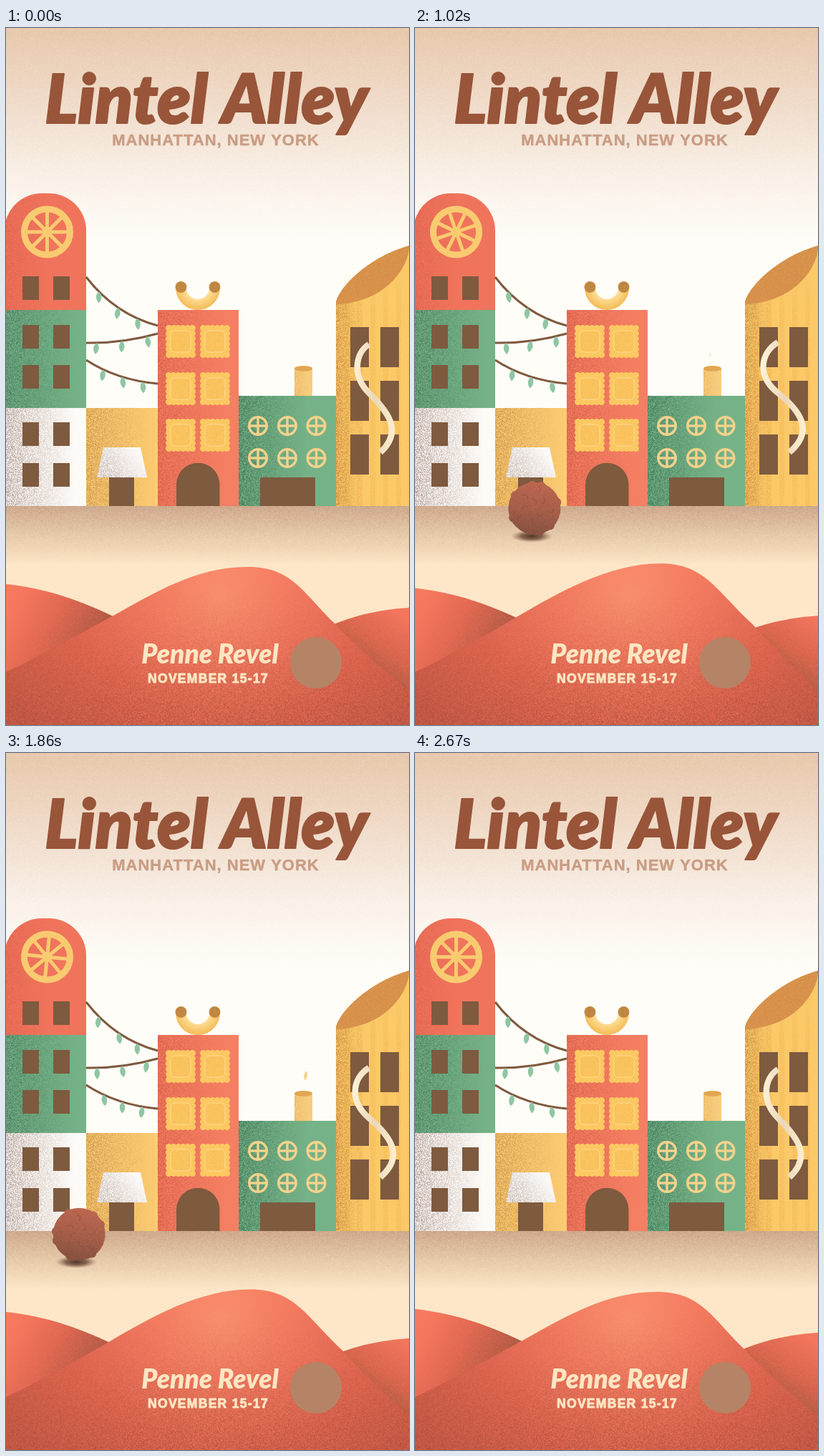
Write an HTML page with a canvas that moves like this. It is 563x974 px and loops after 2.7 s.

```html
<!DOCTYPE html>
<html lang="en">
<head>
<meta charset="utf-8">
<title>Pasta town</title>
<style>
html, body { margin: 0; width: 100%; height: 100%; overflow: hidden; background: #fffdf8; }
canvas { display: block; }
</style>
</head>
<body>
<canvas id="stage" width="563" height="974"></canvas>
<script>
const W = 563, H = 974, LOOP = 2700, STEP = 30, TAU = Math.PI * 2;
const RED = '#f0745c', GREEN = '#76b287', YELLOW = '#fbc968', BROWN = '#7e5a3f', TAN = '#f3d28c';

const makeContext = (w, h) => Object.assign(document.createElement('canvas'), { width: w, height: h }).getContext('2d');
const stage = document.getElementById('stage').getContext('2d');
const town = makeContext(W, H);
const layer = makeContext(W, H);
const lerp = (a, b, p) => a + (b - a) * p;
const ease = u => (1 - Math.cos(Math.PI * Math.min(1, Math.max(0, u)))) / 2;

let seed = 7;
const random = () => (seed = (seed * 16807) % 2147483647) / 2147483647;

// Speckle tile: random alpha per pixel
const tile = makeContext(256, 256);
const speckle = tile.createImageData(256, 256);
for (let i = 3; i < speckle.data.length; i += 4) speckle.data[i] = 255 * random();
tile.putImageData(speckle, 0, 0);
const grain = layer.createPattern(tile.canvas, 'repeat');

function addStops(gradient, stops) {
  for (let i = 0; i < stops.length; i += 2) gradient.addColorStop(stops[i], stops[i + 1]);
  return gradient;
}
const linear = (x0, y0, x1, y1, ...stops) => addStops(stage.createLinearGradient(x0, y0, x1, y1), stops);
const radial = (x, y, r, ...stops) => addStops(stage.createRadialGradient(x, y, 0, x, y, r), stops);

function fill(c, path, paint) {
  c.fillStyle = paint;
  c.fill(path);
}

function stroke(c, path, paint, width) {
  c.strokeStyle = paint;
  c.lineWidth = width;
  c.stroke(path);
}

function stipple(c, path, paint) {
  layer.globalCompositeOperation = 'copy';
  layer.fillStyle = grain;
  layer.fillRect(0, 0, W, H);
  layer.globalCompositeOperation = 'source-in';
  layer.fillStyle = paint;
  layer.fillRect(0, 0, W, H);
  c.save();
  c.clip(path);
  c.drawImage(layer.canvas, 0, 0);
  c.restore();
}

function box(x0, y0, x1, y1) {
  const path = new Path2D();
  path.rect(x0, y0, x1 - x0, y1 - y0);
  return path;
}

function disc(x, y, r) {
  const path = new Path2D();
  path.arc(x, y, r, 0, TAU);
  return path;
}

function label(c, text, x, y, font, paint, spacing = 0, outline = 0) {
  c.font = font;
  c.letterSpacing = spacing + 'px';
  c.textAlign = 'center';
  c.lineJoin = 'round';
  c.fillStyle = paint;
  c.fillText(text, x, y);
  if (outline) {
    c.strokeStyle = paint;
    c.lineWidth = outline;
    c.strokeText(text, x, y);
  }
}

function wall(path, paint, x, shade, reach) {
  fill(town, path, paint);
  stipple(town, path, linear(x, 0, x + reach, 0, 0, shade + 'b8', 1, shade + '00'));
}

function ravioli(x, y) {
  const edge = box(x + 4, y + 4, x + 38, y + 42);
  for (let i = 0; i < 6; i++) {
    const bx = x + 4.5 + i * 6.6, by = y + 4.5 + i * 7.4;
    for (const [px, py] of [[bx, y + 4.5], [bx, y + 41.5], [x + 4.5, by], [x + 37.5, by]]) {
      edge.moveTo(px + 4.5, py);
      edge.arc(px, py, 4.5, 0, TAU);
    }
  }
  fill(town, edge, '#fcc862');
  const seam = new Path2D();
  seam.roundRect(x + 7, y + 8, 28, 30, 6);
  stipple(town, seam, '#f0ac4860');
  stroke(town, seam, '#ffdc92', 1);
}

function roundWindow(x, y) {
  const frame = disc(x, y, 12.3);
  frame.moveTo(x - 12, y);
  frame.lineTo(x + 12, y);
  frame.moveTo(x, y - 12);
  frame.lineTo(x, y + 12);
  stroke(town, frame, TAN, 3.4);
}

const garlands = [
  { from: [112, 348], mid: [152, 400], to: [212, 416], leaves: [0.21, 0.5, 0.75] },
  { from: [112, 440], mid: [162, 441], to: [212, 427], leaves: [0.15, 0.5, 0.85] },
  { from: [112, 464], mid: [155, 492], to: [212, 497], leaves: [0.27, 0.54, 0.81] }
];

function drawTower() {
  const top = new Path2D('M-2 394 V283 A52 52 0 0 1 50 231 H60 A52 52 0 0 1 112 283 V394 Z');
  wall(top, RED, 0, '#d95c48', 60);
  wall(box(0, 394, 112, 531), GREEN, 0, '#37694f', 100);
  wall(box(0, 531, 112, 668), '#fdfaf7', 0, '#93776b', 95);
  for (const y of [347, 415, 471, 551, 608]) {
    for (const x of [23, 66]) fill(town, box(x, y, x + 23, y + 33), BROWN);
  }
}

function drawShop() {
  wall(box(112, 531, 212, 668), '#fbcb72', 112, '#b9803c', 95);
  const awning = new Path2D('M136 586 H188 L197 628 H127 Z');
  fill(town, awning, '#fbf8f5');
  stipple(town, awning, linear(130, 628, 180, 590, 0, '#a08c84c0', 1, '#a08c8400'));
  fill(town, box(144, 628, 179, 668), BROWN);
}

function drawRavioliHouse() {
  wall(box(212, 394, 325, 668), '#f57f62', 212, '#c9503f', 95);
  for (const y of [415, 481, 546]) for (const x of [223, 271]) ravioli(x, y);
  fill(town, new Path2D('M238 668 V638 A30.2 30.2 0 0 1 298.5 638 V668 Z'), BROWN);

  const macaroni = new Path2D();
  macaroni.arc(268, 363, 23.5, 0, Math.PI);
  stroke(town, macaroni, radial(268, 360, 32, 0.45, '#ffe6ad', 0.75, '#fbd17d', 1, '#f5bf5e'), 15);
  for (const x of [244.5, 291.5]) {
    fill(town, disc(x, 362, 8), '#c98f45');
    stipple(town, disc(x, 362, 7), '#95683560');
  }
}

function drawGreenHouse() {
  wall(box(325, 514, 461, 668), GREEN, 325, '#2d6146', 95);
  for (const y of [556, 601]) for (const x of [352, 393, 433.5]) roundWindow(x, y);
  fill(town, box(355, 628, 432, 668), BROWN);
  wall(new Path2D('M403 514 V476 A12.5 4 0 0 1 428 476 V514 Z'), '#f8cf80', 403, '#e3ad58', 26);
  const rim = new Path2D();
  rim.ellipse(415.5, 476, 12.5, 3.8, 0, 0, TAU);
  fill(town, rim, '#e2a652');
}

function drawPenne() {
  const rim = 'C465 364 502 322 563 304';
  const body = new Path2D(`M461 668 V383 ${rim} V668 Z`);
  fill(town, body, YELLOW);
  for (let x = 473; x < W; x += 18) {
    stipple(town, box(x, 340, x + 7, 668), linear(0, 340, 0, 400, 0, '#f0ac4600', 1, '#f0ac4670'));
  }
  stipple(town, body, linear(461, 0, 500, 0, 0, '#b27433c8', 0.45, '#c98b4280', 1, '#c98b4200'));
  const cut = new Path2D(`M461 383 ${rim} C564 333 531 384 461 386 Z`);
  fill(town, cut, '#dc984f');
  stipple(town, cut, '#c4773f60');
  for (const y of [418, 493, 568]) {
    for (const x of [481, 523]) fill(town, box(x, y, x + 26, y + 56), BROWN);
  }
}

function drawTown() {
  const all = box(0, 0, W, H), ground = box(0, 668, W, H);
  fill(town, all, linear(0, 0, 0, 300, 0, '#ebceb3', 0.35, '#f3e0cf', 0.7, '#fbf4ec', 1, '#fffdf8'));
  stipple(town, all, linear(0, 0, 0, 300, 0, '#c68f6228', 0.6, '#d3a98818', 1, '#d3a98800'));
  fill(town, ground, linear(0, 668, 0, 750, 0, '#d6b498', 0.5, '#ebd1b2', 1, '#fde7c8'));
  stipple(town, ground, linear(0, 668, 0, 750, 0, '#a9785858', 0.6, '#c99c7430', 1, '#c99c7400'));
  drawTower();
  drawShop();
  drawRavioliHouse();
  drawGreenHouse();
  drawPenne();
  for (const { from, mid, to } of garlands) {
    stroke(town, new Path2D(`M${from} Q${mid} ${to}`), '#80593e', 3);
  }
  label(town, 'Lintel Alley', 280, 133, 'italic 900 95px Lato, sans-serif', '#98553a', 0, 2);
  label(town, 'MANHATTAN, NEW YORK', 293, 164, 'bold 22px "Liberation Sans", sans-serif', '#c99d84', 1, 0.5);
}

function drawLemon(p) {
  const slice = disc(0, 0, 32);
  for (let a = 0; a < TAU; a += TAU / 8) {
    slice.moveTo(0, 0);
    slice.lineTo(32 * Math.cos(a), 32 * Math.sin(a));
  }
  stage.save();
  stage.translate(57.5, 285);
  stage.rotate(1.31 * p);
  stroke(stage, slice, '#f9cb70', 5);
  stroke(stage, disc(0, 0, 32), '#f9cb70', 9);
  fill(stage, disc(0, 0, 7), '#f9cb70');
  stage.restore();
}

function drawLeaves(t) {
  const leaf = new Path2D('M0 0 C5 4 5 11 0 16 C-5 11 -5 4 0 0 Z');
  garlands.forEach(({ from, mid, to, leaves }, row) => leaves.forEach((u, i) => {
    const point = k => (1 - u) ** 2 * from[k] + 2 * u * (1 - u) * mid[k] + u * u * to[k];
    stage.save();
    stage.translate(point(0), point(1));
    stage.rotate(0.17 * Math.sin(2 * TAU * t / LOOP + i * 1.9 + row));
    fill(stage, leaf, '#8fc6a3');
    stage.restore();
  }));
}

function drawPuff(u, from, to, size, tilt) {
  if (u <= 0 || u >= 1) return;
  const grow = Math.sin(Math.PI * Math.pow(u, 0.7));
  stage.save();
  stage.translate(lerp(from[0], to[0], u) + size * 0.25 * grow, lerp(from[1], to[1], u));
  stage.rotate(lerp(tilt, -0.4, u));
  stage.scale(grow, grow);
  const wisp = new Path2D();
  wisp.ellipse(0, 0, size * 0.2, size / 2, 0, 0, TAU);
  fill(stage, wisp, '#f7d391');
  stage.restore();
}

function drawSteam(t) {
  const phase = t % (LOOP / 2);
  drawPuff((phase - 90) / 720, [421, 466], [412, 440], 14, 0.9);
  drawPuff((phase - 600) / 600, [423, 458], [406, 456], 6, -0.5);
}

function drawNoodle(p) {
  const s = lerp(-2, 4, p);
  const noodle = new Path2D(`M507 ${441 - s / 2} C${485 - s} 455 ${482 - s} 487 507 510 S${558 + s / 2} 562 523 593`);
  stage.save();
  stage.clip(box(481, 418, 549, 624));
  stroke(stage, noodle, linear(484, 0, 546, 0, 0, '#fff3d9', 0.5, '#ead7b8', 1, '#fff0d2'), 8.5);
  stage.restore();
}

function drawMeatball(p) {
  const x = lerp(-60, 180, p), y = lerp(675, 671, p), roll = x / 37;
  stage.save();
  stage.translate(x - 4, y + 39);
  stage.scale(1, 0.3);
  fill(stage, disc(0, 0, 29), radial(0, 0, 29, 0, '#523629', 0.5, '#6b4837cc', 1, '#8d684f00'));
  stage.restore();

  const ball = disc(x, y, 36.5);
  for (const a of [0.1, 0.5, 1.5, 2.6, 3.1, 4.5, 5.5]) {
    const bx = x + 32 * Math.cos(a + roll), by = y + 32 * Math.sin(a + roll);
    ball.moveTo(bx + 6.5, by);
    ball.arc(bx, by, 6.5, 0, TAU);
  }
  fill(stage, ball, linear(x + 10, y - 38, x - 6, y + 38, 0, '#c56a54', 0.5, '#b0634d', 1, '#8b5444'));
  stipple(stage, ball, linear(x, y - 40, x, y + 40, 0, '#7a4c3830', 1, '#6b453460'));
  for (let i = 0; i < 9; i++) {
    const a = i * 2.4 + roll, r = 8 + i * 2.4;
    const lump = new Path2D();
    lump.arc(x + r * Math.cos(a), y + r * Math.sin(a), 4.5, a, a + 2.6);
    stroke(stage, lump, '#7d463550', 1.4);
  }
}

function drawHills(p) {
  const leftY = lerp(777, 783, p), rightY = lerp(810, 822, p);
  const left = new Path2D(`M0 ${leftY} C55 ${leftY + 6} 105 ${leftY + 22} 165 ${leftY + 53} L200 974 H0 Z`);
  fill(stage, left, linear(20, 780, 140, 850, 0, '#f6795f', 0.45, '#e96c55', 1, '#b75f49'));
  stipple(stage, left, linear(40, 780, 145, 840, 0, '#9c4b3700', 1, '#8e483570'));

  const right = new Path2D(`M420 ${rightY + 42} C465 ${rightY + 15} 515 ${rightY + 3} 563 ${rightY} V974 H420 Z`);
  fill(stage, right, linear(545, 815, 490, 905, 0, '#f3765d', 0.5, '#e56a53', 1, '#b55c44'));
  stipple(stage, right, linear(550, 820, 490, 900, 0, '#8e533700', 1, '#8e533780'));

  const x = lerp(338, 343, p), y = lerp(753, 748, p), foot = lerp(460, 472, p);
  const middle = new Path2D(`M0 900 C55 874 100 848 ${lerp(152, 142, p)} ${lerp(820, 823, p)}
    C${lerp(208, 200, p)} 789 ${x - 72} ${y} ${x} ${y}
    C${x + 62} ${y} ${x + 78} ${y + 38} ${foot} 833
    C${foot + 35} 872 535 900 563 928 V974 H0 Z`);
  fill(stage, middle, radial(300, 795, 330, 0, '#fb9170', 0.28, '#f57d62', 0.6, '#e66a54', 1, '#cf5f49'));
  stipple(stage, middle, linear(0, 760, 0, H, 0, '#a84a3500', 0.4, '#a84a3538', 1, '#a14936b0'));
}

function drawFooter() {
  label(stage, 'Penne Revel', 285, 888, 'italic 900 37px Lato, sans-serif', '#fde6c3');
  label(stage, 'NOVEMBER 15-17', 282.5, 915, 'bold 17.5px "Liberation Sans", sans-serif', '#fde6c3', 1.3, 0.9);
  fill(stage, disc(433, 887, 36), '#b58467');
}

function draw(t) {
  const p = t < 1250 ? ease(t / 1200) : 1 - ease((t - 1320) / 1400);
  stage.drawImage(town.canvas, 0, 0);
  drawLemon(p);
  drawLeaves(t);
  drawSteam(t);
  drawNoodle(p);
  drawMeatball(p);
  drawHills(p);
  drawFooter();
}

drawTown();
const start = performance.now();
let shown = -1;
function tick() {
  const t = Math.floor(((performance.now() - start) % LOOP) / STEP) * STEP;
  if (t !== shown) draw(shown = t);
  requestAnimationFrame(tick);
}
tick();
</script>
</body>
</html>
```
